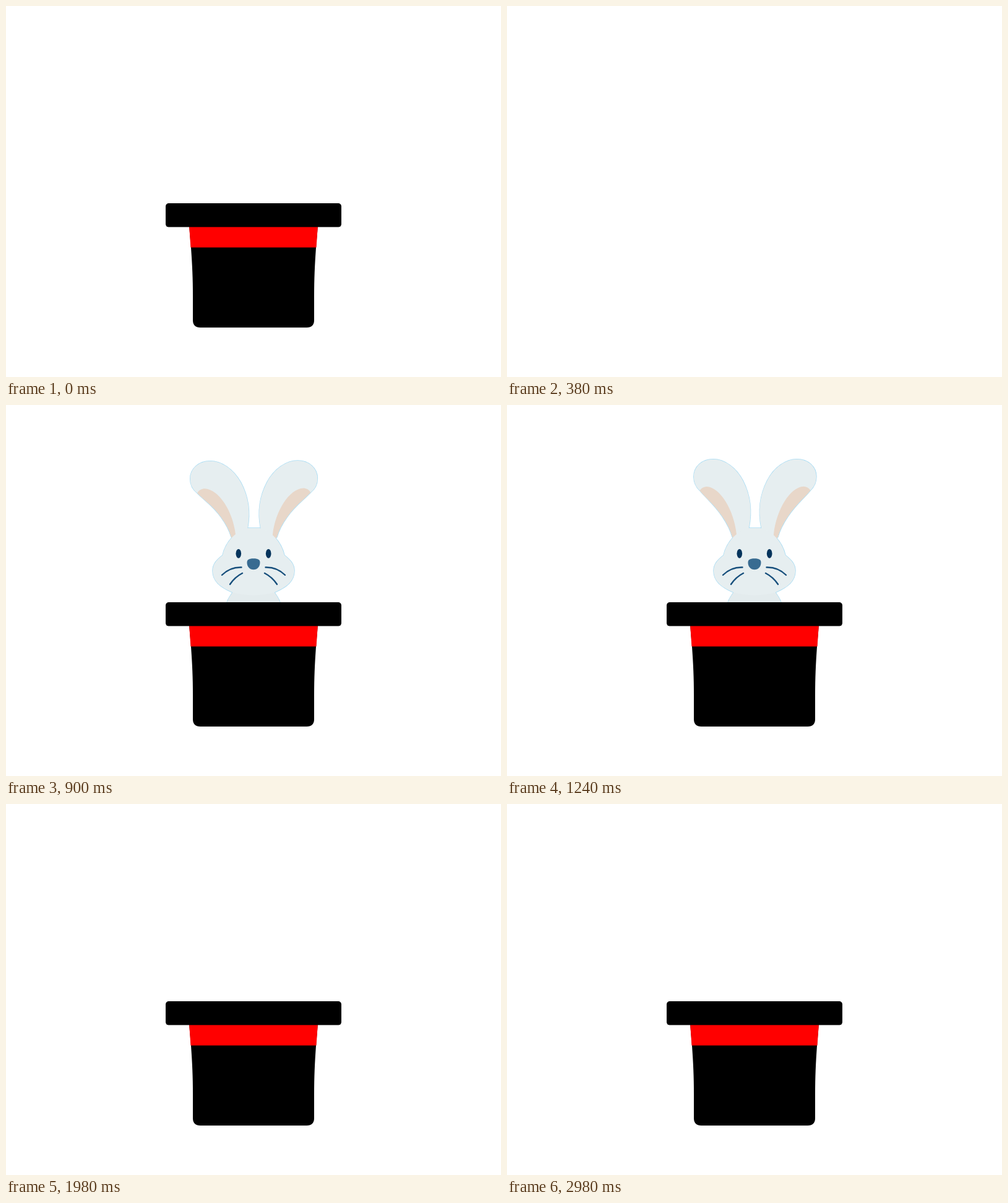
Animation, 800 px wide and 600 px high, one loop 3000 ms. Source, as an HTML page:

```html
<!DOCTYPE html>
<html lang="en">
<head>
<meta charset="utf-8">
<title>Rabbit in a hat</title>
<style>
  html, body { margin: 0; width: 100%; height: 100%; overflow: hidden; background: #fff; }
  svg { display: block; width: 800px; height: 600px; }
  .edge { fill: none; stroke: #a3daf3; stroke-width: 1.5; }
  .fur { fill: #e6eef0; }
  .inner { fill: #e8d7c9; }
  .whisker { fill: none; stroke: #174f7c; stroke-width: 2.4; stroke-linecap: round; }
</style>
</head>
<body>
<svg viewBox="0 0 800 600">
  <defs>
    <clipPath id="aboveRim"><rect width="800" height="330"/></clipPath>
    <path id="head" d="M391 199 L410 199 C428 203 445 221 450 243 C459 250 466 257 466 268
      C466 284 455 294 434 303 C412 309 388 309 366 303 C345 294 334 284 334 268
      C334 257 341 250 350 243 C355 221 372 203 391 199 Z"/>
    <path id="body" d="M370 298 C364 306 360 311 357 319 L350 345 H450 L443 319 C440 311 436 306 430 298 Z"/>
    <path id="ear"/>
    <path id="earR"/>
    <g id="whiskers" class="whisker"><path id="upper"/><path id="lower"/></g>
  </defs>
  <g id="scene">
    <g clip-path="url(#aboveRim)">
      <g id="rabbit">
        <g class="edge">
          <use href="#body"/><use href="#head"/><use href="#ear"/><use href="#earR"/>
        </g>
        <use href="#body" fill="#e3ebed"/>
        <g class="fur"><use href="#ear"/><use href="#earR"/></g>
        <g class="inner"><path id="pink"/><path id="pinkR"/></g>
        <use href="#head" class="fur"/>
        <g fill="#05345c">
          <ellipse class="eye" cx="375.8" cy="240.3" rx="4.3"/>
          <ellipse class="eye" cx="424.2" cy="240.3" rx="4.3"/>
        </g>
        <path id="nose" fill="#386b91" d="M400 248.3 C408 248.3 410.5 250.5 410.5 255
          C410.5 261.5 406 266.3 400 266.3 C394 266.3 389.5 261.5 389.5 255 C389.5 250.5 392 248.3 400 248.3 Z"/>
        <use href="#whiskers"/>
        <use href="#whiskers" transform="translate(800 0) scale(-1 1)"/>
      </g>
    </g>
    <path d="M296 355 H504 L501 391 C499 420 498 440 498 470 V508 Q498 520 486 520 H314 Q302 520 302 508
      V470 C302 440 301 420 299 391 Z"/>
    <path fill="#f00" d="M296 355 H504 L501.5 390.5 H298.5 Z"/>
    <rect x="258" y="319" width="284" height="38.6" rx="5"/>
  </g>
</svg>
<script>
const LOOP = 3000, STEP = 20, DEPTH = 240;
const $ = id => document.getElementById(id);
const eyes = document.querySelectorAll('.eye');

// Each shape has two poses with the same commands.
const poses = {
  ear: [
    'M391 199 C396 175 396 150 382 122 C371 100 352 87 334 87 C316 87 303 99 303 115 C303 124 306 131 312 137 C322 150 335 160 348 180 C356 192 361 202 364 213 L378 228 L391 215 Z',
    'M388 201 C390 180 383 157 369 139 C352 118 331 107 313 107 C291 107 275 121 275 139 C275 153 284 162 297 166 C314 172 333 177 346 188 C355 196 361 206 364 215 L378 228 L388 215 Z'
  ],
  pink: [
    'M312 137 C315 133 319 131 323 131 C345 132 367 170 371 209 L372 222 L364 213 C361 202 356 192 348 180 C335 160 322 150 312 137 Z',
    'M297 166 C300 156 306 154 313 154 C340 155 365 180 371 210 L372 222 L364 215 C361 206 355 196 346 188 C333 177 314 172 297 166 Z'
  ],
  upper: ['M349 275 Q362 262 380.5 262.5', 'M346 261.5 Q362 251 379 256.5'],
  lower: ['M362 290 Q370 278 382 272', 'M355 279 Q365 269 379 266']
};

const clamp = x => Math.max(0, Math.min(1, x));
const smooth = x => x * x * (3 - 2 * x);
const span = (t, a, b) => clamp((t - a) / (b - a));
const bump = (t, mid, half) => smooth(clamp(1 - Math.abs(t - mid) / half));

function blend(name, k) {
  const [a, b] = poses[name];
  const to = b.match(/[\d.]+/g);
  let i = 0;
  return a.replace(/[\d.]+/g, n => (+n + (to[i++] - n) * k).toFixed(2));
}

function draw(t) {
  $('scene').style.display = t >= 380 && t < 400 ? 'none' : '';

  const rise = (1 - span(t, 0, 298)) ** 2;
  const fall = smooth(span(t, 1640, 1900));
  $('rabbit').setAttribute('transform', `translate(0 ${DEPTH * Math.max(rise, fall)})`);

  const spread = (1 - span(t, 200, 1620)) ** 2.45;
  for (const name of ['ear', 'pink']) {
    $(name).setAttribute('d', blend(name, spread));
    $(name + 'R').setAttribute('d', blend(name, spread * 0.82));
    $(name + 'R').setAttribute('transform', 'translate(802 0) scale(-1 1)');
  }

  const sniff = bump(t, 640, 180);
  $('upper').setAttribute('d', blend('upper', sniff));
  $('lower').setAttribute('d', blend('lower', sniff));
  $('nose').setAttribute('transform', `translate(0 ${-4.4 * sniff})`);

  const blink = bump(t, 640, 110);
  eyes.forEach(e => e.setAttribute('ry', 7.4 - 5.3 * blink));
}

const start = performance.now();
function frame() {
  const t = (performance.now() - start) % LOOP;
  draw(Math.floor(t / STEP) * STEP);
  requestAnimationFrame(frame);
}
draw(0);
requestAnimationFrame(frame);
</script>
</body>
</html>
```
